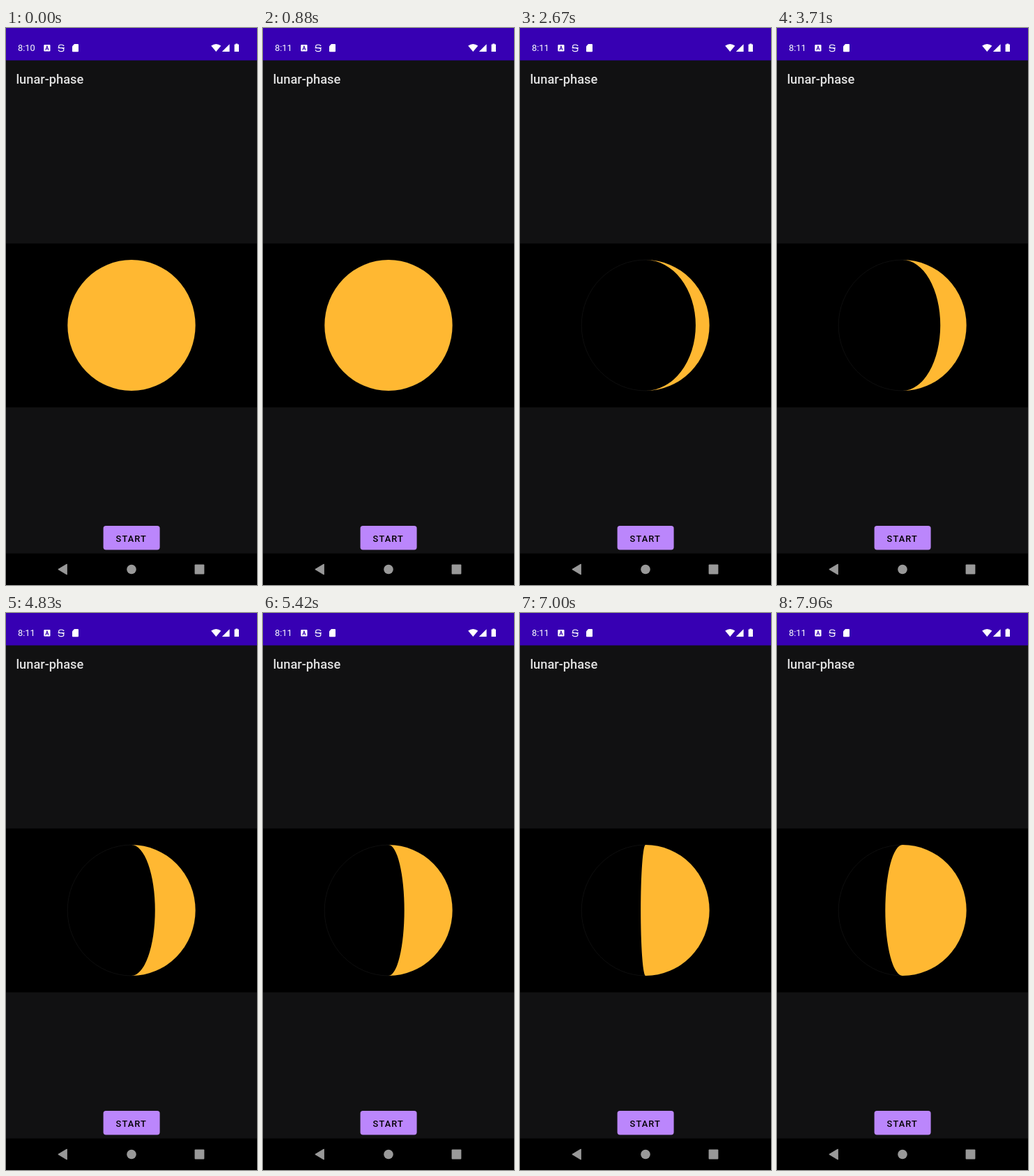
Animation, 360 px wide and 800 px high, one loop 8000 ms. Source, as an HTML page:

```html
<!DOCTYPE html>
<html lang="en">
<head>
<meta charset="utf-8">
<title>lunar-phase</title>
<style>
  html, body { margin: 0; width: 100%; height: 100%; overflow: hidden; background: #121212; }
  svg { display: block; width: 100%; height: 100%; }
  text { font-family: Roboto, sans-serif; }
</style>
</head>
<body>
<svg viewBox="0 0 360 800">
  <defs>
    <radialGradient id="shade" gradientUnits="userSpaceOnUse" cx="185" cy="735" r="38">
      <stop offset="0" stop-color="#000" stop-opacity=".62"/>
      <stop offset=".45" stop-color="#000" stop-opacity=".42"/>
      <stop offset="1" stop-color="#000" stop-opacity="0"/>
    </radialGradient>
  </defs>
  <rect width="360" height="800" fill="#111112"/>

  <!-- status bar -->
  <rect width="360" height="46.5" fill="#3700b3"/>
  <text id="clock" x="17" y="33.3" font-size="12.8" fill="#fff"></text>
  <g fill="#fff">
    <rect x="54.3" y="24" width="9.2" height="9.4" rx="1"/>
    <path d="M95 26.2L98 23H103Q104 23 104 24V33.2Q104 34.2 103 34.2H96Q95 34.2 95 33.2Z"/>
    <path d="M301.3 34L294.2 25.6Q301.3 20.2 308.4 25.6Z"/>
    <path d="M309.8 34L320.6 23.2V34Z"/>
    <path d="M329.3 23.6V22.4H332.3V23.6H334V34H327.6V23.6Z"/>
  </g>
  <path d="M56.7 31.8L58.9 26L61.1 31.8M57.6 30H60.2" fill="none" stroke="#3700b3" stroke-width="1.1"/>
  <path d="M83 26.2Q82.6 24 79.2 24Q75.6 24 75.6 26.4Q75.6 28.7 79.2 28.7Q82.9 28.7 82.9 31.2Q82.9 33.6 79.2 33.6Q75.6 33.6 75.3 31.2M74.6 28.7H83.9"
    fill="none" stroke="#fff" stroke-width="1.2"/>

  <text x="14.4" y="80.2" font-size="18.3" font-weight="500" fill="#e0e0e0">lunar-phase</text>

  <!-- sky -->
  <rect y="309.5" width="360" height="235.3" fill="#000"/>
  <ellipse cx="180" cy="427" rx="91.8" ry="94" fill="none" stroke="#101010" stroke-width=".9"/>
  <path id="moon" fill="#ffb832"/>

  <!-- button -->
  <rect x="139.6" y="715" width="81" height="34.4" rx="3.7" fill="#bb86fc"/>
  <text x="157.6" y="737.6" font-size="12.8" font-weight="500" letter-spacing="1.14" fill="#000">START</text>
  <rect id="ripple" x="139.6" y="715" width="81" height="34.4" rx="3.7" fill="url(#shade)"/>

  <!-- navigation bar -->
  <rect y="754.7" width="360" height="46" fill="#000"/>
  <g fill="#999">
    <path d="M74.8 777.5L87.3 770V785Z" stroke="#999" stroke-linejoin="round"/>
    <circle cx="180" cy="777.5" r="6.8"/>
    <rect x="270.6" y="770.6" width="13.8" height="13.8" rx="1"/>
  </g>
  <circle id="touch" cx="185.3" cy="741.8" r="9.5" fill="#d8d2dc" fill-opacity=".72"/>
</svg>
<script>
  const LOOP = 8000, RX = 91.7, RY = 94, CX = 180, CY = 427;
  const MINUTE = 800, PRESS = 1560, RESET = 1630, RELEASE = 1700;
  const [clock, moon, ripple, touch] =
    ['clock', 'moon', 'ripple', 'touch'].map(id => document.getElementById(id));

  // [time, x of the shadow edge on the moon's equator]
  const edgeSteps = [[1670, 271.7], [1730, 269.5], [2670, 252], [3710, 234.3],
                     [4830, 213.8], [6000, 191.8], [7960, 155.3], [8000, 154.6]];
  const rippleSteps = [[PRESS, 0], [1650, 1], [1710, 1], [2000, 0]];

  function track(steps, t) {
    if (t <= steps[0][0]) return steps[0][1];
    for (let i = 1; i < steps.length; i++) {
      const [t0, a] = steps[i - 1], [t1, b] = steps[i];
      if (t <= t1) return a + (b - a) * (t - t0) / (t1 - t0);
    }
    return steps[steps.length - 1][1];
  }

  function moonPath(edge) {
    const top = `${CX} ${CY - RY}`, bottom = `${CX} ${CY + RY}`;
    const bulge = Math.max(Math.abs(edge - CX), .01);
    return `M${top}A${RX} ${RY} 0 0 1 ${bottom}` +
           `A${bulge} ${RY} 0 0 ${edge > CX ? 0 : 1} ${top}Z`;
  }

  function draw(now) {
    const t = now % LOOP;
    clock.textContent = t < MINUTE ? '8:10' : '8:11';
    moon.setAttribute('d', moonPath(t < RESET ? CX - RX : track(edgeSteps, t)));
    ripple.setAttribute('opacity', track(rippleSteps, t));
    touch.setAttribute('opacity', t >= PRESS && t < RELEASE ? 1 : 0);
  }

  const start = performance.now();
  function tick() {
    draw(performance.now() - start);
    requestAnimationFrame(tick);
  }
  tick();
</script>
</body>
</html>
```
